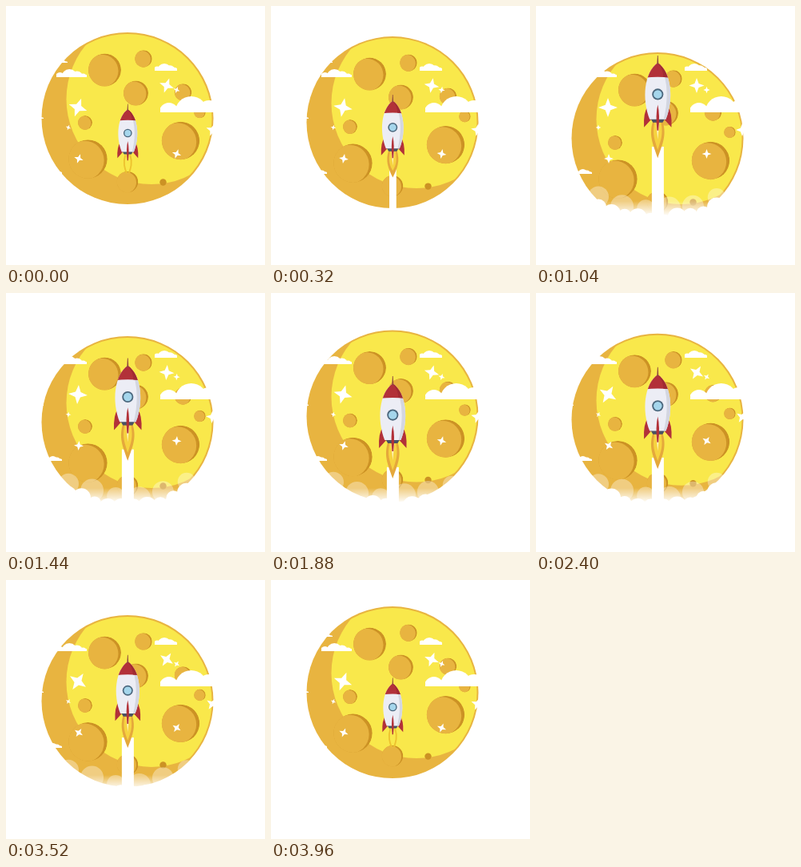
An HTML page with a canvas that plays this animation: 324 by 324 pixels, repeating every 4 s.

```html
<!DOCTYPE html>
<html lang="en">
<head>
<meta charset="utf-8">
<title>Rocket and moon</title>
<style>
html, body { margin: 0; width: 100%; height: 100%; overflow: hidden; background: #fff; }
canvas { display: block; width: 324px; height: 324px; }
</style>
</head>
<body>
<canvas width="324" height="324"></canvas>
<script>
const ctx = document.querySelector('canvas').getContext('2d');
const LOOP = 4000, SWING = 1840, TAU = 2 * Math.PI;
const GOLD = '#e8b440', SHADE = '#cc9224', YELLOW = '#f9e84b', RED = '#b23139';

// x, y, radius
const craters = [[123.5, 80, 20.5], [172, 66, 10.7], [162.5, 109, 15.5], [221.5, 108, 10.7], [99, 146, 9],
  [218.5, 168.5, 23.7], [242.5, 133, 7.3], [102.5, 191.5, 24.3], [152, 220, 13.3]];
const stars = [[90, 127, 12], [78, 152, 3.4], [91, 191, 6], [201, 99.5, 9.5], [213.5, 105, 4.2],
  [213.5, 185, 6], [258, 155, 8]];
// left, width, base line, height
const clouds = [[63, 38, 89, 10], [186, 28, 81, 9], [193, 90, 133, 20], [50, 20, 210, 6], [30, 17, 141, 4], [60, 17, 71, 4]];

function smooth(from, to, t) {
  const u = Math.max(0, Math.min(1, (t - from) / (to - from)));
  return u * u * (3 - 2 * u);
}

const swing = (t, peak) => Math.cos((t - peak) / SWING * TAU);

function circle(x, y, r, color) {
  ctx.beginPath();
  ctx.arc(x, y, r, 0, TAU);
  ctx.fillStyle = color;
  ctx.fill();
}

function clipCircle(x, y, r) {
  ctx.beginPath();
  ctx.arc(x, y, r, 0, TAU);
  ctx.clip();
}

function shape(path, color) {
  ctx.fillStyle = color;
  ctx.fill(new Path2D(path));
}

function drawCrater([x, y, r]) {
  ctx.save();
  clipCircle(x, y, r);
  circle(x, y, r, SHADE);
  circle(x - r * .17, y + r * .06, r, GOLD);
  ctx.restore();
}

function drawMoon(dy) {
  ctx.save();
  ctx.translate(0, dy);
  circle(152, 140.5, 107.5, GOLD);
  clipCircle(152, 140.5, 105.5);
  circle(182, 116.5, 106.5, YELLOW);
  craters.forEach(drawCrater);
  circle(196.5, 220.5, 4.2, SHADE);
  ctx.restore();
}

function drawCloud([left, width, base, height]) {
  ctx.save();
  ctx.beginPath();
  ctx.rect(left, 0, width, base);
  ctx.clip();
  const bump = (place, size) => circle(left + width * place, base, height * size, '#fff');
  bump(.12, .6);
  bump(.43, 1);
  bump(.68, .75);
  bump(.88, .45);
  ctx.fillRect(left, base - height * .3, width, height);
  ctx.restore();
}

function drawStar([x, y, r], angle) {
  ctx.beginPath();
  for (let i = 0; i < 8; i++) {
    const a = angle + i * TAU / 8, d = i % 2 ? r * .38 : r;
    ctx.lineTo(x + d * Math.cos(a), y + d * Math.sin(a));
  }
  ctx.fillStyle = '#fff';
  ctx.fill();
}

function drawStreak(x, y, length, peak, t) {
  const alpha = 1 - Math.abs(t - peak) / 160;
  if (alpha <= 0) return;
  const slide = (t - peak) * .12;
  ctx.save();
  ctx.globalAlpha = alpha;
  ctx.translate(x, y);
  ctx.rotate(-.48);
  ctx.translate(-slide, 0);
  shape(`M0 -1.2L${length} 0L0 1.2Z`, '#fff');
  ctx.restore();
}

// Puffs lie along a shallow valley; the white front row hides the foot of the moon.
function puffRow(count, floor, radius, color, t) {
  for (let i = 0; i < count; i++) {
    const side = 2 * i / (count - 1) - 1;
    const bob = 2 * Math.sin(4 * TAU * t / LOOP + i * 1.7);
    circle(152 + 74 * side, floor - 17 * side * side + bob, radius + 2 * Math.sin(i * 2.3), color);
  }
}

function drawSmoke(t, amount) {
  if (!amount) return;
  ctx.save();
  ctx.translate(0, 30 * (1 - amount));
  puffRow(6, 255, 13, `rgba(255,255,255,${.34 * amount})`, t);
  const haze = ctx.createLinearGradient(0, 244, 0, 263);
  haze.addColorStop(0, 'rgba(255,255,255,0)');
  haze.addColorStop(1, '#fff');
  ctx.fillStyle = haze;
  ctx.fillRect(60, 244, 190, 60);
  puffRow(10, 268, 10, '#fff', t);
  ctx.restore();
}

function drawFlame(tip, lit) {
  if (lit) {
    shape(`M-6 33C-11 50 -7 59 0 ${tip}C7 59 11 50 6 33Z`, '#e5a83b');
    shape(`M-4 35C-7 50 -4 56 0 ${tip - 10}C4 56 7 50 4 35Z`, '#f6d33f');
    shape('M-2 36L0 56L2 36Z', '#fff3bd');
  } else {
    ctx.strokeStyle = '#edc22f';
    ctx.lineWidth = 2.4;
    ctx.stroke(new Path2D('M-4 36C-8 49 -5 58 -2 66M4 36C8 49 5 58 2 66'));
  }
}

function drawRocket(y, size, amount, t) {
  const tip = 69 + 9 * amount + Math.sin(20 * TAU * t / LOOP);
  const trail = 15 * amount;
  ctx.fillStyle = '#fff';
  ctx.fillRect(152.4 - trail / 2, y + (tip - 14) * size, trail, 200);

  ctx.save();
  ctx.translate(152.3, y);
  ctx.scale(size, size);
  drawFlame(tip, amount > .15);
  shape('M-12 15Q-18 22 -17 41L-8 31ZM12 15Q18 22 17 41L8 31Z', RED);
  shape('M-9 30H9L6 35H-6Z', '#4a5263');

  ctx.save();
  ctx.clip(new Path2D('M0 -39C17 -27 20 6 10 31H-10C-20 6 -17 -27 0 -39Z'));
  shape('M-20 -45H20V40H-20Z', '#ecedf5');
  shape('M9 -45H22V40H5Q15 5 9 -20Z', '#d3d6e1');
  shape('M-20 -45H20V-20Q0 -23 -20 -20Z', RED);
  shape('M3 -45H20V-20Q14 -21 7 -21.3Q7 -30 0 -39Z', '#a02a32');
  ctx.restore();

  shape('M-.4 -48H.4L1 -37H-1Z', '#8f4a3d');
  circle(0, 0, 7, '#4b677d');
  circle(0, 0, 5.2, '#a5d6ec');
  shape('M0 13Q3 26 .8 45H-.8Q-3 26 0 13Z', RED);
  ctx.restore();
}

function draw(t) {
  // The second half of the loop mirrors the first.
  const half = Math.min(t, LOOP - t);
  const rise = smooth(0, 780, half);
  const launch = smooth(0, 600, half);
  const thrust = smooth(120, 480, half);
  const angle = .35 - .35 * Math.sin(TAU * t / LOOP);

  ctx.fillStyle = '#fff';
  ctx.fillRect(0, 0, 324, 324);
  drawMoon(rise * (19 + 6 * swing(half, 1080)));
  clouds.forEach(drawCloud);
  stars.forEach(star => drawStar(star, angle));
  drawStreak(167, 96.5, 51, 640, t);
  drawStreak(155, 185, 43, 2880, t);
  drawStreak(42, 176, 24, 2960, t);
  drawSmoke(t, thrust);
  drawRocket(159 - launch * (27.5 + 21.3 * swing(half, 1000)), .76 + .25 * rise, thrust, t);
}

const start = performance.now();
function tick() {
  const elapsed = (performance.now() - start) % LOOP;
  draw(Math.floor(elapsed / 40) * 40);
  requestAnimationFrame(tick);
}
tick();
</script>
</body>
</html>
```
